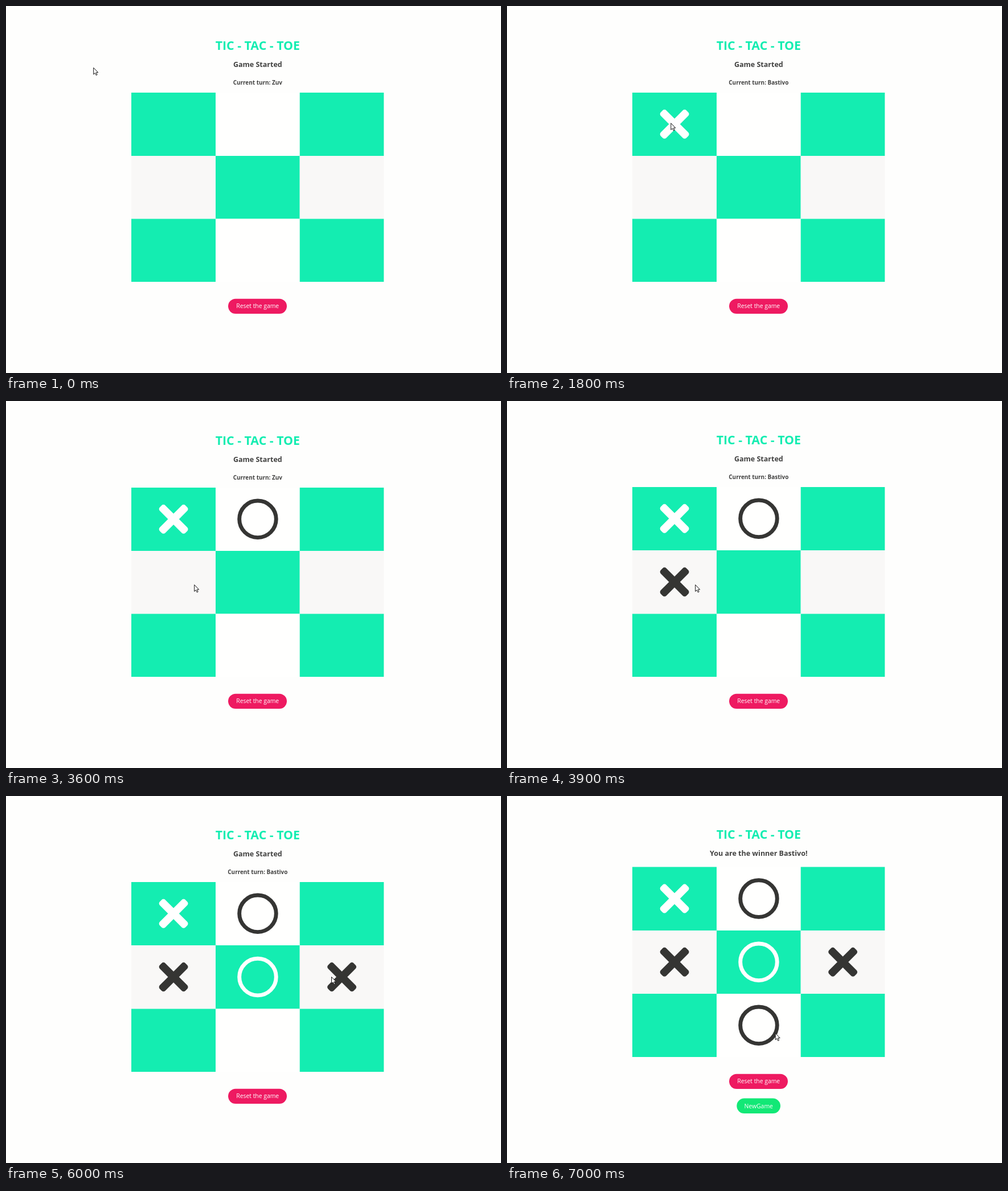
Recreate the animation shown at these times as an HTML page. Size 869 by 644 pixels, loop 8000 ms.

```html
<!DOCTYPE html>
<html lang="en">
<head>
<meta charset="utf-8">
<title>Tic - Tac - Toe</title>
<style>
  html, body { margin: 0; width: 100%; height: 100%; overflow: hidden; background: #fefefd; }
  svg { display: block; width: 869px; height: 644px; }
  text { font-family: "Open Sans", "Noto Sans", sans-serif; text-anchor: middle; }
  .bold { font-weight: 700; fill: #414140; }
  .label { font-size: 10.4px; fill: #fff; }
</style>
</head>
<body>
<svg id="stage" viewBox="0 0 869 644">
  <defs>
    <g id="cross">
      <rect x="-31.8" y="-6.8" width="63.6" height="13.6" rx="4.5" transform="rotate(45)"/>
      <rect x="-31.8" y="-6.8" width="63.6" height="13.6" rx="4.5" transform="rotate(-45)"/>
    </g>
    <circle id="ring" r="32.3" fill="none" stroke="currentColor" stroke-width="6.9"/>
  </defs>
  <text id="title" class="bold" x="441.8" font-size="21.3" style="fill:#14edb1">TIC - TAC - TOE</text>
  <text id="status" class="bold" x="441.8" font-size="12.5"></text>
  <text id="turn" class="bold" x="441.8" y="137.5" font-size="9.95"></text>
  <g id="board"></g>
  <g id="reset">
    <rect x="390" width="103" height="26.3" rx="13.15" fill="#ee1a61"/>
    <text class="label" x="441.7" y="16.8">Reset the game</text>
  </g>
  <g id="again">
    <rect x="403.3" y="530.6" width="76.7" height="26.4" rx="13.2" fill="#12e876"/>
    <text class="label" x="441.7" y="547.6">NewGame</text>
  </g>
  <path id="cursor" d="M0 0V11.6L2.7 9.2L4.5 13.2L6.4 12.4L4.6 8.4H8Z"
        fill="#fff" stroke="#151515" stroke-width="1" stroke-linejoin="round"/>
</svg>
<script>
const LOOP = 8000, STEP = 100;
const PLAYERS = ["Zuv", "Bastivo"];
const COLUMNS = [220, 368, 515.7, 663.3];

// Page layouts: the page shifts as the board fills up.
const LAYOUTS = [
  { from: 0, rows: [152, 263, 373.5, 484], title: 76.5, status: 106.6, turn: 137.5, reset: 513.7 },
  { from: 3900, rows: [151, 262, 373.5, 484], title: 76, status: 105.8, turn: 136.8, reset: 513.7 },
  { from: 7000, rows: [124.5, 236, 347, 458], title: 75.3, status: 105.2, turn: 0, reset: 487.7 }
];

// Moves of the game: time and cell, the players alternate.
const TURNS = [[1700, 0], [2900, 1], [3900, 3], [4900, 4], [6000, 5], [7000, 7]];

// Pointer moves: start time, number of steps, end position.
const PATH = [
  [0, 1, 153.7, 108.3], [100, 1, 163.5, 114], [400, 1, 172.5, 115.5],
  [600, 4, 287.8, 205.6], [2400, 3, 430.5, 214.2], [3200, 1, 409.8, 237.5],
  [3400, 3, 330.7, 322.5], [4700, 1, 489.8, 317.5], [5500, 3, 571.5, 317.5],
  [6500, 4, 471.2, 416.3]
];

const $ = id => document.getElementById(id);
const set = (el, attrs) => Object.entries(attrs).forEach(([k, v]) => el.setAttribute(k, v));
const add = (name, attrs) => {
  const el = document.createElementNS("http://www.w3.org/2000/svg", name);
  set(el, attrs);
  return $("board").appendChild(el);
};
const show = (el, on) => set(el, { visibility: on ? "visible" : "hidden" });

const cellFill = i => i % 2 === 0 ? "#14edb1" : i === 3 || i === 5 ? "#f9f8f7" : "#fffffe";
const cells = Array.from({ length: 9 }, (_, i) => add("rect", {
  x: COLUMNS[i % 3], width: COLUMNS[i % 3 + 1] - COLUMNS[i % 3], fill: cellFill(i)
}));
const marks = TURNS.map(([, cell], n) => {
  const color = cell % 2 === 0 ? "#fff" : "#353533";
  return add("use", { href: n % 2 ? "#ring" : "#cross", fill: color, color });
});

function pointerAt(time) {
  let [, , x, y] = PATH[0];
  for (const [start, steps, endX, endY] of PATH) {
    if (time < start) break;
    const part = Math.min(1, (Math.floor((time - start) / STEP) + 1) / steps);
    x += (endX - x) * part;
    y += (endY - y) * part;
  }
  return [x, y];
}

function render(time) {
  const layout = LAYOUTS.filter(l => time >= l.from).pop();
  const played = TURNS.filter(([at]) => time >= at).length;
  const won = played === TURNS.length;
  const { rows } = layout;

  cells.forEach((cell, i) => {
    const row = Math.floor(i / 3);
    set(cell, { y: rows[row], height: rows[row + 1] - rows[row] });
  });
  marks.forEach((mark, n) => {
    const cell = TURNS[n][1], col = cell % 3, row = Math.floor(cell / 3);
    const x = (COLUMNS[col] + COLUMNS[col + 1]) / 2 + 0.1;
    const y = (rows[row] + rows[row + 1]) / 2 - 0.2;
    set(mark, { transform: `translate(${x} ${y})` });
    show(mark, n < played);
  });

  set($("title"), { y: layout.title });
  set($("status"), { y: layout.status });
  set($("turn"), { y: layout.turn });
  set($("reset"), { transform: `translate(0 ${layout.reset})` });
  $("status").textContent = won ? `You are the winner ${PLAYERS[1]}!` : "Game Started";
  $("turn").textContent = `Current turn: ${PLAYERS[played % 2]}`;
  show($("turn"), !won);
  show($("again"), won);
  set($("cursor"), { transform: `translate(${pointerAt(time)})` });
}

const begin = performance.now();
function frame() {
  render((performance.now() - begin) % LOOP);
  requestAnimationFrame(frame);
}
frame();
</script>
</body>
</html>
```
